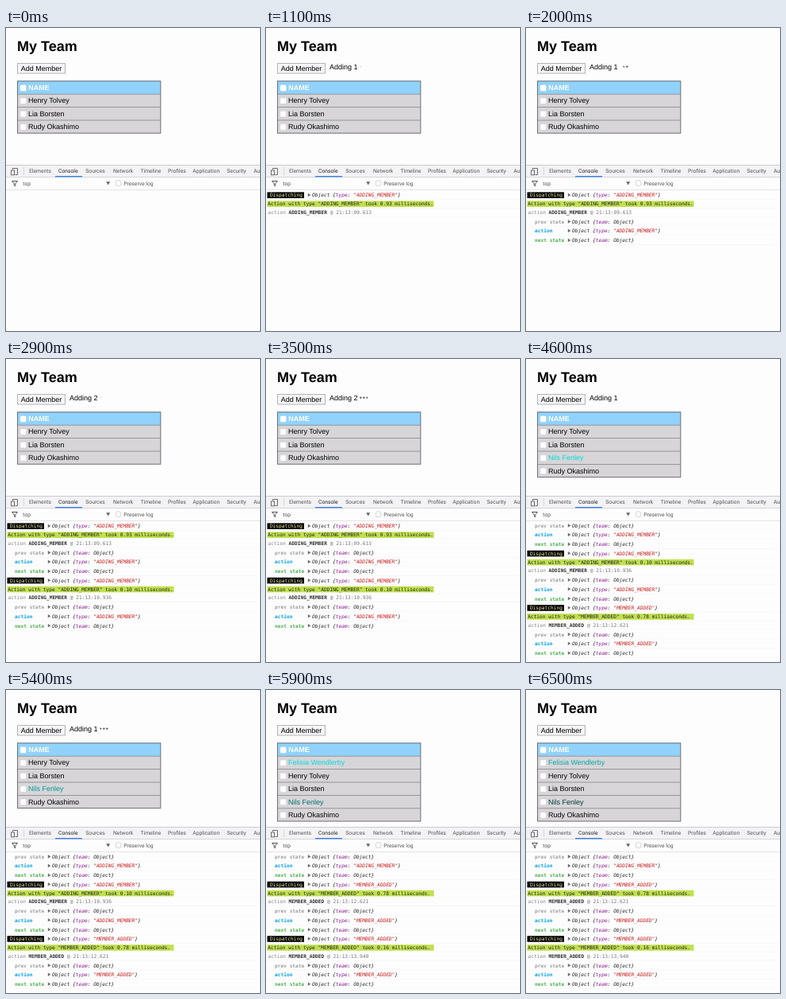
Recreate the animation shown at these times as an HTML page. Size 320 by 381 pixels, loop 6.6 s.

```html
<!DOCTYPE html>
<html lang="en">
<head>
<meta charset="utf-8">
<title>My Team</title>
<style>
  html, body { margin: 0; width: 100%; height: 100%; overflow: hidden; background: #fefdfe; }
  svg { display: block; }
  text { white-space: pre; text-rendering: geometricPrecision; }
  .page { font: 9px "Liberation Sans", Arial, sans-serif; }
  .title { font: bold 18px "Liberation Sans", Arial, sans-serif; }
  .tool { font: 6.75px Roboto, sans-serif; fill: #555; }
  .log { font: 6.2px "DejaVu Sans Mono", monospace; fill: #222; }
  .b { font-weight: bold; }
  .i { font-style: italic; }
</style>
</head>
<body>
<svg id="stage" width="320" height="381" viewBox="0 0 320 381"></svg>
<script>
const LOOP = 6600, STEP = 100, FADE = 3000, PULSE = 1800;
const ROW = 16.4, BLOCK = 68.4, LOG_TOP = 204.5;
const LINE_Y = [212.2, 223.2, 233.7, 245.7, 257.2, 269.2];

const members = [
  { name: "Felisia Wendlerby", added: 5500 },
  { name: "Henry Tolvey" },
  { name: "Lia Borsten" },
  { name: "Nils Fenley", added: 4200 },
  { name: "Rudy Okashimo" }
];
const actions = [
  { at: 1100, type: "ADDING_MEMBER", took: "0.93", clock: "21:13:09.613" },
  { at: 2400, type: "ADDING_MEMBER", took: "0.10", clock: "21:13:10.936" },
  { at: 4200, type: "MEMBER_ADDED", took: "0.78", clock: "21:13:12.621" },
  { at: 5500, type: "MEMBER_ADDED", took: "0.16", clock: "21:13:13.940" }
];

const clamp = v => Math.max(0, Math.min(1, v));
const rect = (x, y, w, h, fill, more = "") =>
  `<rect x="${x}" y="${y}" width="${w}" height="${h}" fill="${fill}" ${more}/>`;
const text = (x, y, s, cls, fill) =>
  `<text x="${x}" y="${y}" class="${cls}"${fill ? ` style="fill:${fill}"` : ""}>${s}</text>`;
const path = (d, fill, stroke = "none") =>
  `<path d="${d}" fill="${fill}" stroke="${stroke}"/>`;
const span = (s, fill, cls = "") => `<tspan class="${cls}" style="fill:${fill}">${s}</tspan>`;
const checkbox = (x, y, size, stroke) =>
  rect(x, y, size, size, "#fff", `rx="1.5" stroke="${stroke}" stroke-width=".5"`);

function dots(t) {
  const p = (t / PULSE + 0.5) % 1;
  return [0, 1, 2].map(k => {
    const a = clamp(Math.min((p - 0.07 - 0.12 * k) / 0.15, (0.61 + 0.1 * k - p) / 0.12));
    return `<circle cx="${119.3 + 4 * k}" cy="48.6" r="${0.6 + 0.6 * a}" fill="#555" opacity="${a}"/>`;
  }).join("");
}

function header(t) {
  const count = actions.reduce((n, a) =>
    t < a.at ? n : n + (a.type === "ADDING_MEMBER" ? 1 : -1), 0);
  const pressed = actions.some(a =>
    a.type === "ADDING_MEMBER" && t < a.at && t >= a.at - STEP);
  return text(14, 29, "My Team", "title") +
    rect(14.5, 44.5, 60, 12.5, pressed ? "#e6e6e8" : "#f5f4f6", 'stroke="#b4b4b6"') +
    text(18.7, 53.6, "Add Member", "page") +
    (count ? text(80, 52.2, "Adding " + count, "page") + dots(t) : "");
}

function table(t) {
  const rows = members.filter(m => !m.added || t >= m.added);
  let out = rect(14, 66.5, 181, 16.5, "#90d2fa") + checkbox(17.8, 71.5, 7.8, "#c5d5e0") +
    text(28.3, 78.3, "NAME", "page b", "#fff");
  rows.forEach((m, i) => {
    const y = 83.2 + i * ROW;
    const v = m.added ? Math.round(255 * clamp(1 - (t - m.added) / FADE)) : 0;
    out += rect(14, y, 181, ROW, "#d7d5d8") + rect(14, y - 0.4, 181, 0.8, "#858488") +
      checkbox(17.8, y + 4.6, 7.8, "#c4c2c6") +
      text(28, y + 11.2, m.name, "page", `rgb(0,${v},${v})`);
  });
  return out + rect(14.5, 66.8, 180.3, 16.2 + rows.length * ROW, "none", 'stroke="#717074"');
}

function toolbar() {
  const tabs = { Elements: 29, Console: 66, Sources: 100.3, Network: 135, Timeline: 169.5,
    Profiles: 204, Application: 235.3, Security: 278.3, Audits: 312 };
  return rect(0, 172, 320, 209, "#fefdfe") + rect(0, 172, 320, 15.5, "#f3f2f4") +
    rect(0, 172, 320, 0.8, "#c2c1c4") + rect(0, 187, 320, 0.8, "#cfced1") +
    rect(0, 203, 320, 0.8, "#dddcdf") +
    rect(62, 186, 34, 1.4, "#3f80e8") + rect(22, 175, 0.7, 10, "#ccc") +
    path("M8.5 178V176.5H14.5V184.5H11.5", "none", "#6a6a6a") +
    rect(6.5, 179, 4, 5.8, "#f3f2f4", 'stroke="#6a6a6a"') +
    Object.entries(tabs).map(([s, x]) =>
      text(x, 182.4, s, "tool", s === "Console" ? "#222" : "")).join("") +
    path("M7.5 192.5H14.5L11.8 195.6V198.8L10.2 197.8V195.6Z", "none", "#555") +
    text(21.3, 197.5, "top", "tool") + path("M126.2 193.3h5l-2.5 4.2z", "#666") +
    checkbox(138.4, 192, 6.3, "#aaa") + text(148.3, 197.5, "Preserve log", "tool");
}

function objectText(y, key, value, fill) {
  return path(`M52.8 ${y - 4.6}l3.6 2.3l-3.6 2.3z`, "#6e6e6e") +
    text(58, y, `Object {${span(key, "#881391")}: ${span(value, fill)}}`, "log i");
}

function logBlock(a, top, lines) {
  const y = LINE_Y.map(v => v + top);
  const type = `"${a.type}"`;
  const typed = n => objectText(y[n], "type", type, "#c41a16");
  const team = n => objectText(y[n], "team", "Object", "#222");
  const label = (x, n, s, fill) => text(x, y[n], s, "log b", fill);
  return [
    rect(1.5, y[0] - 5.8, 46.5, 7.6, "#000") + text(4.9, y[0], "Dispatching", "log", "#f4f0a4") + typed(0),
    rect(1.5, y[1] - 5.8, 210, 7.6, "#c1e050") +
      text(2.2, y[1], `Action with type ${type} took ${a.took} milliseconds.`, "log"),
    text(2.5, y[2], span("action ", "#888") + span(a.type, "#333", "b") +
      span(" @ " + a.clock, "#777"), "log"),
    label(11, 3, "prev state", "#9e9e9e") + team(3),
    label(11, 4, "action", "#03a0e4") + typed(4),
    label(11, 5, "next state", "#4caf50") + team(5)
  ].slice(0, lines).map((s, n) => s + rect(0, y[n] + 3.2, 320, 0.5, "#f1f0f2")).join("");
}

function consoleLog(t) {
  const shown = actions.filter(a => t >= a.at);
  const scroll = Math.max(0, shown.length * BLOCK - 171.2);
  return '<g clip-path="url(#log)">' + shown.map((a, i) =>
    logBlock(a, i * BLOCK - scroll, t < actions[0].at + STEP ? 3 : 6)).join("") + "</g>";
}

const stage = document.getElementById("stage");
const clip = `<clipPath id="log">${rect(0, LOG_TOP, 320, 381 - LOG_TOP, "#000")}</clipPath>`;
let last = -1;

function draw() {
  const t = Math.floor(performance.now() % LOOP / STEP) * STEP;
  if (t !== last) {
    stage.innerHTML = clip + header(t) + table(t) + toolbar() + consoleLog(t);
    last = t;
  }
  requestAnimationFrame(draw);
}
draw();
</script>
</body>
</html>
```
